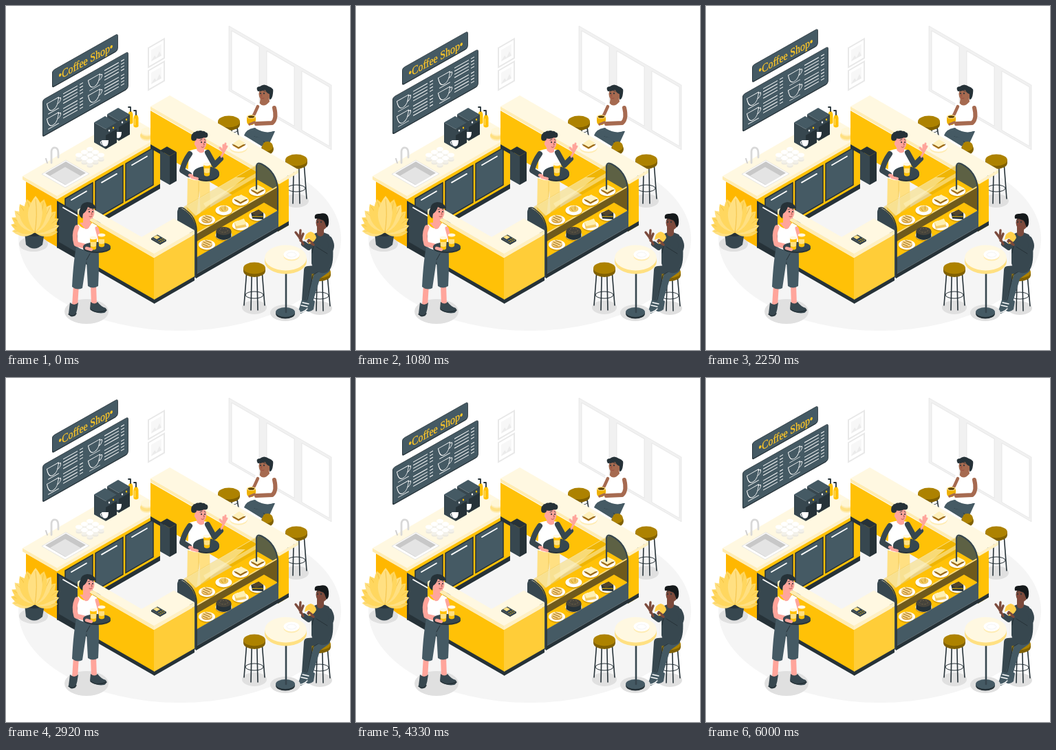
Write an HTML page that moves like this. It is 500x500 px and loops after 6040 ms.

```html
<!DOCTYPE html>
<html lang="en">
<head>
<meta charset="utf-8">
<style>
  html, body { margin: 0; width: 100%; height: 100%; overflow: hidden; background: #fff; }
  svg { display: block; width: 100vw; height: 100vh; }
</style>
</head>
<body>
<svg id="stage" viewBox="0 0 500 500"></svg>
<script>
const DARK = '#37474f', INK = '#263238', SLATE = '#455a64', GOLD = '#ffc107', AMBER = '#ffb700', LIGHT = '#ffcd38';
const CREAM = '#fff8e1', EDGE = '#ffecb3', PALE = '#ffe082', OCHRE = '#ad8200', OLIVE = '#806000', SHADE = '#e0e0e0';
const PEACH = '#ffa59b', BROWN = '#a66a50', UMBER = '#7c4a3c';
const ISO = .577;

const times = (count, draw) => Array.from({ length: count }, (_, i) => draw(i)).join('');
const path = (d, fill, extra = '') => `<path d="${d}" fill="${fill}" ${extra}/>`;
const line = (d, color, width = 1, extra = '') =>
  path(d, 'none', `stroke="${color}" stroke-width="${width}" stroke-linecap="round" stroke-linejoin="round" ${extra}`);
const oval = (x, y, rx, ry, fill, extra = '') => `<ellipse cx="${x}" cy="${y}" rx="${rx}" ry="${ry}" fill="${fill}" ${extra}/>`;
const group = (transform, content) => `<g transform="${transform}">${content}</g>`;
const at = (x, y, content) => group(`translate(${x} ${y})`, content);

// Isometric pieces: a plane reaches left and right from its front corner; a wall falls (1) or climbs (-1) to the right.
const plane = (x, y, left, right, fill, extra) =>
  path(`M${x} ${y}l${right} ${-right * ISO}l${-left} ${-left * ISO}l${-right} ${right * ISO}Z`, fill, extra);
const wall = (x, y, width, height, slope, fill, extra) =>
  path(`M${x} ${y}l${width} ${slope * width * ISO}v${height}l${-width} ${-slope * width * ISO}Z`, fill, extra);
const box = (x, y, left, right, height, [top, leftFill, rightFill]) =>
  wall(x - left, y - left * ISO, left, height, 1, leftFill) + wall(x, y, right, height, -1, rightFill) + plane(x, y, left, right, top);
const dish = (x, y, rx, fill = '#fff', under = EDGE) => oval(x, y + 2, rx, rx * .6, under) + oval(x, y, rx, rx * .6, fill);

function room() {
  const picture = wall(0, 0, 23, 28, -1, '#fff', 'stroke="#e8e8e8" stroke-width="2"') +
    wall(4, 3, 15, 17, -1, '#f7f7f7') + path('M4 19l5 -8l3 3l4 -9l3 6Z', '#ebebeb');
  const pane = i => wall(328 + i * 51, 36 + i * 29.3, 40, 86, 1, '#fff', 'stroke="#e4e4e4" stroke-width=".8"');
  return oval(252.5, 338, 234.5, 134, '#f5f5f5') +
    wall(324, 29, 149, 94, 1, '#f1f1f1', 'stroke="#e6e6e6" stroke-width=".8"') + times(3, pane) +
    at(207, 61, picture) + at(207, 94, picture);
}

function signs() {
  const cup = line('M-9 -7H8Q7 7 0 7Q-7 7 -9 -7M8 -5Q13 -6 10 0Q8 2 6 2M-7 9H8', '#fff', .9);
  const rows = times(8, i => line(`M30 ${8 + i * 4.6 + (i > 3 ? 3 : 0)}h20m4 0h4`, '#fff', 1.1));
  const column = at(15, 16, cup) + at(15, 38, cup) + rows;
  const board = (width, height) =>
    `<rect x="-.5" y="1" width="${width}" height="${height}" rx="3" fill="${INK}"/><rect width="${width}" height="${height}" rx="3" fill="${SLATE}" stroke="${INK}" stroke-width=".7"/>`;
  return group('matrix(1 -.565 0 1 53.5 136.5)', board(124, 53) + column + at(60, 0, column)) +
    group('matrix(1 -.565 0 1 67.5 94)', board(95, 24)) +
    `<text transform="matrix(.82 -.45 0 1 116 85.5)" text-anchor="middle" font-family="'Liberation Serif', serif" font-size="17" fill="#ffc727" stroke="#ffc727" stroke-width=".3">•Coffee Shop•</text>`;
}

function machine(x, y) {
  const cup = path('M0 0h10q0 9 -5 9q-5 0 -5 -9Z', '#fff') + line('M1 2q-5 0 -1 4', '#fff', 1.2);
  return box(x, y, 17, 16, 29, [SLATE, DARK, INK]) + wall(x, y, 16, 9, -1, DARK) +
    oval(x + 5, y + 2, 1.2, 1.5, '#fff') + oval(x + 11, y - 2, 1.2, 1.5, GOLD) + at(x - 6, y + 16, cup);
}

function bottle(x, y) {
  return at(x, y, path('M-3.5 18V6Q-3 2 -1 1H1Q3 2 3.5 6V18Q0 21 -3.5 18Z', GOLD) +
    line('M0 1V-5L-3 -5', INK, 1.8) + line('M-1.5 7V16', PALE, 1));
}

function backCounter() {
  const door = i => at(86 + i * 44, 280 - i * 25.4, wall(0, 0, 40, 54, -1, SLATE, `stroke="${INK}" stroke-width="1.5"`) + line('M9 2l22 -12.7', '#fff', 1.8));
  const cup = i => {
    const x = 122 + (i % 3 - Math.floor(i / 3)) * 8, y = 208 + (i % 3 + Math.floor(i / 3)) * 4.3;
    return dish(x, y + 5, 4.5, '#f3f1ea', '#ebe8df') + oval(x, y, 5, 3.2, '#fff');
  };
  return box(74, 281, 45, 150, 69, [CREAM, AMBER, GOLD]) + wall(74, 345, 150, 7, -1, INK) + times(3, door) +
    box(74, 276, 50, 153, 5, [CREAM, EDGE, '#fff0c2']) +
    plane(86, 264, 34, 35, '#fff', 'stroke="#ddd" stroke-width=".7"') + plane(86, 260, 29, 30, '#c8c8c8') + plane(87, 260, 23, 22, '#e4e4e4') +
    line('M66 228V211Q67 205 72 206Q76 207 76 214V220', '#d8d8d8', 2.8) + line('M58 222l2 6', '#d0d0d0', 2) +
    times(9, cup) + dish(205, 188, 10, PALE) + dish(205, 182, 9, '#fff6d6') +
    bottle(181, 152) + bottle(189, 157) + machine(164, 167) + machine(145, 179);
}

function sandwich() {
  return plane(0, 5, 9, 10, '#cc9130') + plane(0, 2, 9, 10, '#fff1bd') + line('M-9 -2l9 5l10 -5', '#6c4d15', 1);
}

function sideCounter() {
  return wall(210, 152, 156, 54, 1, GOLD) + wall(210, 201, 20, 6, 1, INK) +
    box(395, 256, 0, 16, 72, [CREAM, GOLD, GOLD]) + wall(395, 322, 16, 6, -1, INK) +
    box(397, 254, 187, 28, 5, [CREAM, EDGE, '#fff0c2']) +
    box(238, 218, 14, 10, 42, [INK, DARK, INK]) + dish(338, 204, 13) + at(338, 203, sandwich());
}

function stool(x, y, height) {
  const foot = y + height;
  const leg = i => {
    const side = i * 2 - 3, drop = Math.abs(side) > 1 ? -3 : 4;
    return `M${x + side * 3.7} ${y + 4}L${x + side * 5} ${foot + drop}`;
  };
  return oval(x, foot, 18, 10, SHADE) + line([0, 1, 2, 3].map(leg).join(''), INK, 1.6) +
    oval(x, foot - 18, 13, 5, 'none', `stroke="${INK}" stroke-width="1"`) +
    path(`M${x - 16} ${y}v4a16 9 0 0 0 32 0v-4Z`, OLIVE) + oval(x, y, 16, 8.5, OCHRE);
}

function face(x, y, skin, dir = 1) {
  return at(x, y, group(`scale(${dir} 1)`, oval(0, 0, 8.5, 10.5, skin) + oval(-7, 1, 2.2, 3, skin) +
    oval(1, -1, .9, 1.3, INK) + oval(6, -1, .8, 1.3, INK) + line('M-1 -4l3 -1m3 0l2 1', INK, .8) +
    line('M4 0l1.4 3h-1.4M1 6q2 1.5 4 -.5', '#9c443c', .8)));
}

function seatedWoman() {
  return stool(324, 168, 30) +
    path('M361 177Q349 179 346 188L380 206L391 182Z', SLATE) + line('M361 190Q374 192 379 203', INK, 1) +
    oval(380, 208, 9, 8, OLIVE) + oval(380, 204, 8, 7, OCHRE) + path('M346 188l26 16q8 -12 -10 -14Z', SLATE) +
    path('M370 133H382L384 144L368 146Z', BROWN) +
    path('M362 142L368 141Q375 149 383 139L390 144Q393 160 391 181Q378 187 363 178L365 162Z', '#fff') +
    line('M366 146L361 157L354 167', BROWN, 4.5) + line('M390 148Q394 164 387 170L364 171', BROWN, 6) +
    face(376, 128, BROWN, -1) + path('M366 124Q362 117 369 117Q375 112 382 117Q390 119 388 127Q387 136 383 136V128Q378 126 377 122Q371 124 366 124Z', INK) +
    path('M350 161H363V167Q361 173 356 173Q350 173 350 167Z', '#eeb000') + oval(356.5, 161, 6.5, 3, PALE) + oval(356.5, 161, 4.7, 1.8, '#5e4205') +
    line('M361 169l-7 3', BROWN, 3.5);
}

function glass(x, y) {
  return at(x, y, path('M-5 -7H5L4 8Q0 11 -4 8Z', GOLD) + path('M-4 -2H4V4Q0 6 -4 4Z', PALE) + oval(0, -8, 5.5, 2.4, CREAM));
}

function tray(x, y, rx, ry) {
  return oval(x, y + 2, rx, ry, INK) + oval(x, y, rx, ry, DARK);
}

function barista() {
  const curl = i => {
    const angle = Math.PI * (.95 + i / 7);
    return oval(282 + Math.cos(angle) * 9, 191 + Math.sin(angle) * 6, 4, 4, INK);
  };
  return path('M264 248H296L297 300Q290 308 283 305L281 268L277 305Q269 308 263 303Z', PALE) + line('M280 255V278', '#f0c450', .8) +
    path('M266 211Q277 205 292 209L298 222L297 250Q281 257 264 250Z', '#fff') +
    line('M267 215Q259 226 256 239L266 245', DARK, 8) + line('M293 213L303 231L312 222', DARK, 8) +
    line('M267 246l10 3', PEACH, 4.5) + line('M313 219L317 211L319 200M316 211V202M316 212L311 206M317 211L321 204', PEACH, 3) +
    path('M279 206H288V212Q282 216 277 209Z', PEACH) + face(283, 199, PEACH) + times(7, curl) + oval(281, 189, 8, 4, INK) +
    tray(291, 243, 19, 10) + glass(292, 238) + line('M270 249l8 2', PEACH, 4);
}

const pastries = {
  sandwich: sandwich(),
  donut: dish(0, -2, 8, '#f8d68a', '#d9a23f') + line('M-5 -4l9 4M-2 -6l8 3M-6 -1l7 3', '#9c6a1a', 1),
  roll: oval(0, -2, 7, 4.5, '#f1c85c') + line('M-4 -3l3 4m3 -7v5', '#c89227', .8),
  cake: path('M-11 -6V3Q0 11 11 3V-6Z', INK) + oval(0, -6, 11, 6, '#46443c') + oval(0, -7, 6, 3, 'none', 'stroke="#77684b" stroke-dasharray="2 2"'),
  pie: path('M-9 -4L5 -9L9 2L-7 5Z', '#f3cb66') + path('M-9 -5L5 -10L9 -2L-6 1Z', '#fff0b2'),
  slice: path('M-9 -4L2 -9L9 -4V5L-7 4Z', INK) + path('M-9 -4L2 -9L9 -4L-2 0Z', '#51452d') + line('M-7 1h15', GOLD, 1.2)
};

function displayCase() {
  const shelf = (y, kinds) => kinds.map((kind, i) =>
    at(292 + i * 24.4, y - i * 14, dish(0, 0, 12, '#fff', '#dda200') + pastries[kind])).join('');
  return path('M364 268V232Q365 226 372 229Q393 240 396 265V291Z', '#5d6144') +
    wall(258, 292, 106, 36, -1, '#dba600', 'opacity=".45"') +
    wall(276, 330, 119, 36, -1, '#6f5a1c') + plane(276, 330, 22, 112, GOLD) + wall(276, 330, 119, 2, -1, PALE) +
    plane(276, 366, 20, 119, GOLD) + shelf(311, ['donut', 'roll', 'sandwich', 'sandwich']) + shelf(347, ['donut', 'cake', 'pie', 'slice']) +
    path('M262 291L334 249H348L276 305Z', '#fff3c4', 'opacity=".6"') + path('M287 287L363 243V249L290 292Z', '#fff3c4', 'opacity=".5"') +
    line('M258 293L368 229', '#fff2c1', .7) +
    line('M364 266V233Q365 226 372 230Q393 241 395 266V302', DARK, 2.2) +
    wall(276, 366, 120, 24, -1, SLATE) + wall(276, 390, 120, 6, -1, INK) +
    path('M249 314V299Q250 291 257 295Q274 305 277 325V396L272 393V335Z', DARK) + line('M251 294Q256 291 262 297Q276 307 277 325V394', INK, 1.5);
}

function frontCounter() {
  return wall(74, 283, 32, 65, 1, INK) + wall(77, 287, 28, 56, 1, DARK) + line('M83 293l21 12', '#fff', 1.8) +
    wall(104, 302, 111, 63, 1, GOLD) + wall(215, 366, 59, 63, -1, LIGHT) +
    wall(74, 345, 141, 6, 1, INK) + wall(215, 427, 59, 6, -1, INK) +
    box(215, 360, 111, 12, 6, [CREAM, EDGE, EDGE]) + box(215, 360, 30, 59, 6, [CREAM, EDGE, '#fff0c2']) +
    box(224, 345, 13, 9, 2, [DARK, INK, INK]) + plane(219, 339, 5, 5, PALE) + line('M222 341l6 -3m-4 5l6 -3', GOLD, 1, 'stroke-dasharray="1 2"');
}

function plant() {
  const leaf = i => {
    const spread = (i % 2 ? 1 : -1) * (1 - Math.floor(i / 2) / 6), size = 1.02 - Math.abs(spread) * .38;
    return at(42, 329, group(`rotate(${spread * 88}) scale(${size})`,
      path('M0 0Q-13 -16 -9 -33Q-6 -44 1 -52Q13 -38 10 -22Q9 -8 0 0Z', i % 3 ? '#ffd75f' : PALE) + line('M0 0Q4 -25 1 -47', '#f0bc3c', .8)));
  };
  return oval(40, 346, 21, 11, SHADE) + path('M27 329L29 347Q41 358 53 347L56 329Z', DARK) + oval(41, 329, 14.5, 6, INK) + times(13, leaf);
}

function customer() {
  return oval(117, 444, 32, 18, SHADE) + line('M102 405L100 436M127 405L128 435', PEACH, 8) +
    path('M93 431Q99 437 105 431Q104 441 101 450Q93 454 91 447ZM123 430Q129 435 133 430Q138 437 145 439Q148 443 143 446Q130 448 122 440Z', DARK) +
    line('M91 448Q97 453 102 447M123 441Q132 448 146 442', INK, 1.5) +
    path('M103 345L134 347Q136 366 134 407Q126 412 119 407L117 370L111 410Q103 414 96 408Q98 369 103 345Z', SLATE) + line('M117 369l5 -9', INK) +
    line('M117 306V316', PEACH, 10) + path('M105 317Q116 330 125 315L132 319Q136 332 133 351Q117 360 102 349Q106 335 102 323Z', '#fff') +
    path('M107 315L124 314Q121 326 115 324Z', PEACH) + line('M103 322Q98 333 102 346L122 351', PEACH, 7) + line('M132 323l4 15l3 11', PEACH, 5) +
    face(120, 300, PEACH) + path('M108 294Q109 286 118 285Q128 285 131 294Q124 296 119 292Q117 299 112 302L111 309Q103 304 108 294Z', INK) +
    tray(132, 350, 20, 7) + glass(127, 345) + glass(139, 341) + line('M117 352l7 2', PEACH, 4.5);
}

function tableForTwo() {
  return stool(361, 381, 57) + stool(456, 387, 52) +
    line('M462 382L439 384L436 428', DARK, 12) + line('M466 383L452 393L442 426', SLATE, 10) + line('M459 383L446 391L438 427', INK, 1) +
    path('M430 427L440 430L439 440Q432 447 424 448Q420 446 426 440ZM442 425L449 429L447 441Q441 446 436 443Z', SLATE) +
    line('M424 446Q432 446 438 440M429 435l9 2M431 431l9 2', '#fff', 1.3) +
    path('M448 331Q457 326 469 332Q477 343 475 369Q473 390 458 388Q446 385 444 374L444 350Z', DARK) +
    line('M450 335L440 351L433 346', DARK, 8) + line('M470 339Q477 352 467 359L446 345', DARK, 8) + line('M467 360L451 350M447 349l-2 10', INK) +
    line('M457 320V330', UMBER, 10) + face(459, 315, UMBER, -1) +
    path('M449 309Q447 301 456 302Q468 299 469 310Q470 319 466 322L463 314Q461 309 449 309Z', '#15191b') +
    line('M432 346L427 337L421 329M427 338L428 326M428 341L432 331M447 347l-8 -5', UMBER, 3.4) +
    path('M434 340Q435 329 443 328Q450 330 451 337Q447 345 439 346Q443 341 441 337Z', '#ffd04b') + line('M445 344l-5 -4', UMBER, 3) +
    oval(406, 446, 22, 12, SHADE) + oval(406, 447, 14, 7.5, INK) + oval(406, 445, 14, 7, SLATE) + line('M407 382V445', DARK, 2.6) +
    path('M376 366v5a30.5 18.5 0 0 0 61 0v-5Z', PALE) + oval(406.5, 366, 30.5, 18.5, CREAM) + dish(415, 361.5, 11.5) + oval(415, 361.5, 7, 3.6, '#fff', 'stroke="#eee" stroke-width=".7"');
}

document.getElementById('stage').innerHTML = room() + `<g id="signs">${signs()}</g>` +
  backCounter() + stool(422, 224, 59) + seatedWoman() + sideCounter() + barista() + displayCase() + frontCounter() +
  plant() + customer() + tableForTwo();

const floating = document.getElementById('signs');
const LOOP = 6040, HALF = 3000, RISE = 10;

function render(time) {
  const t = time % LOOP;
  const lift = Math.max(0, RISE * (1 - Math.abs(t - HALF) / HALF));
  floating.setAttribute('transform', `translate(0 ${-lift})`);
}

const start = performance.now();
function tick() {
  render(performance.now() - start);
  requestAnimationFrame(tick);
}
render(0);
requestAnimationFrame(tick);
</script>
</body>
</html>
```
